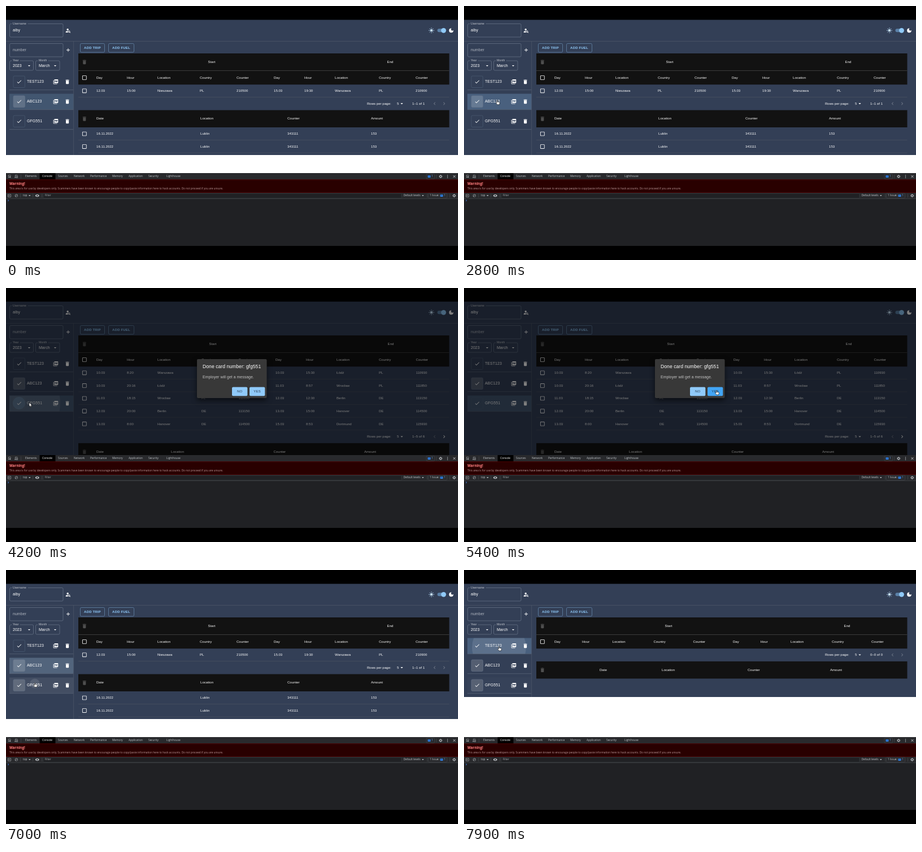
Write an HTML page with a canvas that moves like this. It is 800 px wide and 450 px high and loops after 8 s.

```html
<!DOCTYPE html>
<html>
<head>
<meta charset="utf-8">
<style>
html, body { margin: 0; width: 100%; height: 100%; overflow: hidden; background: #000 }
canvas { display: block }
</style>
</head>
<body>
<canvas id="stage" width="800" height="450"></canvas>
<script>
const c = document.getElementById('stage').getContext('2d');
const LOOP = 8000, ROW = 22.6;
const SANS = '"Liberation Sans", Arial, sans-serif', TOOL = '"Open Sans", "Noto Sans", sans-serif';
const BG = '#333f56', BLUE = '#90caf9', SOFT = '#c2c6cd', LINE = '#4c5668', EDGE = '#647084';

const ICON = {
  trash: 'M6 19c0 1.1.9 2 2 2h8c1.1 0 2-.9 2-2V7H6v12zM19 4h-3.5l-1-1h-5l-1 1H5v2h14V4z',
  check: 'M9 16.17 4.83 12l-1.42 1.41L9 19 21 7l-1.41-1.41z',
  pdf: 'M20 2H8c-1.1 0-2 .9-2 2v12c0 1.1.9 2 2 2h12c1.1 0 2-.9 2-2V4c0-1.1-.9-2-2-2zm-8.5 7.5c0 .83-.67 1.5-1.5 1.5H9v2H7.5V7H10c.83 0 1.5.67 1.5 1.5v1zm5 2c0 .83-.67 1.5-1.5 1.5h-2.5V7H15c.83 0 1.5.67 1.5 1.5v3zm4-3H19v1h1.5V11H19v2h-1.5V7h3v1.5zM4 6H2v14c0 1.1.9 2 2 2h14v-2H4V6z',
  person: 'M14 8a4 4 0 1 0-8 0 4 4 0 0 0 8 0zM10.4 14C6 13.8 2 16 2 18v2h9.5c-1-2-1.3-4-1.1-6zM19.4 18a4 4 0 1 0-1.4 1.4L20.6 22 22 20.6zM16 18a2 2 0 1 1 0-4 2 2 0 0 1 0 4z',
  drop: 'M7 10l5 5 5-5z',
  add: 'M19 13h-6v6h-2v-6H5v-2h6V5h2v6h6z',
  prev: 'M15.41 7.41 14 6l-6 6 6 6 1.41-1.41L10.83 12z',
  next: 'M10 6 8.59 7.41 13.17 12l-4.58 4.59L10 18l6-6z',
  box: 'M19 5v14H5V5h14m0-2H5c-1.1 0-2 .9-2 2v14c0 1.1.9 2 2 2h14c1.1 0 2-.9 2-2V5c0-1.1-.9-2-2-2z',
  moon: 'M12 3a9 9 0 1 0 9 9c0-.46-.04-.92-.1-1.36a5.4 5.4 0 0 1-4.4 2.26 5.4 5.4 0 0 1-3.14-9.8C12.92 3.04 12.46 3 12 3z',
  eye: 'M12 5C7 5 3 8 1 12c2 4 6 7 11 7s9-3 11-7c-2-4-6-7-11-7zm0 11a4 4 0 1 1 0-8 4 4 0 0 1 0 8z',
  close: 'M19 6.4 17.6 5 12 10.6 6.4 5 5 6.4 10.6 12 5 17.6 6.4 19 12 13.4 17.6 19 19 17.6 13.4 12z',
  pick: 'M3 3h16v6h-2V5H5v12h4v2H3zM10 10l11 4-4.500 2 4 4-1.500 1.500-4-4-2 4z',
  device: 'M5 3h15v4h-2V5H7v12h4v3H2v-3h3zM13 9h8v12h-8zM15 11v7h4v-7z',
  panel: 'M3 3h18v18H3zM5 5v14h14V5zM9 8l6 4-6 4z',
  block: 'M12 2a10 10 0 1 0 0 20 10 10 0 0 0 0-20zM12 4a8 8 0 0 1 5 1.700L5.700 17A8 8 0 0 1 12 4zM18.300 7A8 8 0 0 1 7 18.300z',
  arrow: 'M0 0V16l3.700-3.500L6.200 18l2.600-1.200L6.400 11.400H11.500z',
  hand: 'M-1.500 1.500Q0-1 1.500 1.500V7L8 8.500Q10 9 9.700 11.500L8 18H0L-5.500 11.500Q-5-.5 9-1.500 11z'
};
ICON.hand = 'M-1.500 1.500Q0-1 1.500 1.500V7L8 8.500Q10 9 9.700 11.500L8 18H0L-5.500 11.500Q-5 9-1.500 11z';
for (const k in ICON) ICON[k] = new Path2D(ICON[k]);

const TRIP = ['Day', 'Hour', 'Location', 'Country', 'Counter'], FUEL = ['Date', 'Location', 'Counter', 'Amount'];
const cells = s => s.split(' ');
const CARDS = [
  { name: 'TEST123', y: 134, trips: [], fuel: [], page: '0–0 of 0', bottom: 225,
    cols: [160, 209, 262.5, 335.5, 405.5, 476, 524.5, 578, 651, 721], fcols: [240, 350, 502, 648], heads: [362, 678] },
  { name: 'ABC123', y: 169, page: '1–1 of 1', bottom: 264,
    trips: ['12.03 15:00 Nieszawa PL 210500 15.03 19:30 Warszawa PL 210900'].map(cells),
    fuel: Array(2).fill(cells('16.11.2022 Lublin 343111 153')),
    cols: [160, 214, 268, 343, 408, 474, 528, 582, 660, 725], fcols: [160, 344, 498, 646], heads: [364, 680] },
  { name: 'GFG551', y: 204, page: '1–5 of 6', bottom: 296, fuel: [],
    trips: ['10.03 8:20 Warszawa PL 110300 10.03 15:30 Łódź PL 110930',
      '10.03 20:16 Łódź PL 110930 11.03 8:57 Wrocław PL 111850',
      '11.03 18:15 Wrocław PL 111850 12.03 12:30 Berlin DE 113150',
      '12.03 20:00 Berlin DE 113150 13.03 15:00 Hanover DE 114500',
      '13.03 8:00 Hanover DE 114500 15.03 8:53 Dortmund DE 115930'].map(cells),
    cols: [160, 214, 268, 346, 411.5, 477, 531, 585, 660, 725.5], fcols: [160, 292, 473.5, 634], heads: [366, 681] }
];

// time, x, y of the pointer tip
const PATH = [[1500, 300, 362], [1800, 200, 225], [2000, 200, 225], [2600, 59, 166.5], [2800, 59, 166.5],
  [3500, 23, 203], [3900, 23, 203], [4200, 41, 203], [4500, 62, 206], [4600, 62, 206], [5200, 447, 181],
  [5500, 447, 181], [5900, 137, 219], [6000, 111, 219], [6250, 57, 167], [6450, 57, 167], [6750, 51, 199.5],
  [7150, 51, 199.5], [7450, 62, 135], [8000, 62, 135]];
// time, x, y, card of each press
const CLICKS = [[3830, 23, 204, 2], [6350, 57, 169, 1], [6880, 51, 201, 2], [7500, 62, 137, 0]];
const SELECT = [[0, 1], [3900, 2], [6400, 1], [7100, 2], [7700, 0]];

const clamp = x => Math.max(0, Math.min(1, x));
const smooth = x => (x = clamp(x), x * x * (3 - 2 * x));

function pointer(t) {
  if (t < PATH[0][0]) return null;
  const i = PATH.findIndex(p => p[0] > t), a = PATH[i - 1], b = PATH[i];
  const k = (t - a[0]) / (b[0] - a[0]);
  return { x: a[1] + (b[1] - a[1]) * k, y: a[2] + (b[2] - a[2]) * k };
}
function rect(x, y, w, h, fill) { c.fillStyle = fill; c.fillRect(x, y, w, h); }
function round(x, y, w, h, r, fill, stroke, lw = .6) {
  c.beginPath(); c.roundRect(x, y, w, h, r);
  if (fill) { c.fillStyle = fill; c.fill(); }
  if (stroke) { c.strokeStyle = stroke; c.lineWidth = lw; c.stroke(); }
}
function disc(x, y, r, fill) { c.beginPath(); c.arc(x, y, r, 0, 7); c.fillStyle = fill; c.fill(); }
function text(s, x, y, size = 6, fill = '#fff', { font = SANS, bold = '', align = 'left', gap = .04 } = {}) {
  c.font = `${bold} ${size}px ${font}`;
  c.letterSpacing = gap + 'px';
  c.textAlign = align; c.textBaseline = 'middle';
  c.fillStyle = fill; c.fillText(s, x, y);
}
function icon(name, x, y, fill = '#fff', scale = .43) {
  c.save(); c.translate(x, y); c.scale(scale, scale); c.translate(-12, -12);
  c.fillStyle = fill; c.fill(ICON[name], 'evenodd'); c.restore();
}
function rays(x, y, r, R, n, color, w) {
  c.strokeStyle = color; c.lineWidth = w; c.beginPath();
  for (let i = 0; i < n; i++) {
    const a = i * Math.PI * 2 / n, u = Math.cos(a), v = Math.sin(a);
    c.moveTo(x + u * r, y + v * r); c.lineTo(x + u * R, y + v * R);
  }
  c.stroke();
}
function gear(x, y) {
  rays(x, y, 1.8, 3, 8, '#c0c4c8', 1);
  c.beginPath(); c.arc(x, y, 1.7, 0, 7); c.lineWidth = 1; c.stroke();
}
function field(x, y, w, h, label, labelW) {
  round(x, y, w, h, 2, null, EDGE, .8);
  if (!label) return;
  rect(x + 4, y - 2, labelW, 4, BG);
  text(label, x + 5.5, y, 5.1, SOFT);
}

function header(shift) {
  rect(0, 62, 800, .8, LINE);
  field(6.5, 31.5, 94.5, 23.5, 'Username', 28);
  text('alby', 12, 43.5, 7);
  icon('person', 110, 43.5);
  const x = -shift * 6.5;
  disc(753 + x, 43.3, 2.3, '#c5e2fa');
  rays(753 + x, 43.3, 3.2, 4.8, 8, '#b5d8f6', 1);
  round(763.5 + x, 40.3, 14.5, 6, 3, '#5b81a8');
  disc(774.5 + x, 43.3, 4.4, BLUE);
  icon('moon', 788 + x, 43.3);
}

function sidebar(t, sel, hover, shift) {
  field(6.5, 66.5, 94.5, 23.5);
  text('number', 12, 78.3, 7, '#b0b6c0');
  icon('add', 110 - shift, 78);
  field(6.5, 97, 42, 17, 'Year', 14);
  text('2023', 12, 105.8, 7); icon('drop', 41, 105.8);
  field(52.5, 97, 42.5, 17, 'Month', 18);
  text('March', 58, 105.8, 7); icon('drop', 87, 105.8);
  const right = 119.3 - shift * 1.5;
  rect(right, 62, .8, 234, LINE);
  CARDS.forEach((card, i) => {
    const y = card.y, top = y - 13.5;
    if (i == sel) rect(6, top, right - 6, 28, `rgba(144,202,249,${hover == i ? .24 : .16})`);
    else if (hover == i) rect(6, top, right - 6, 28, 'rgba(255,255,255,.08)');
    rect(6, y + 14.3, right - 6, .8, '#566175');
    const done = i == 1 || i == 2 && t >= 5600;
    round(13, y - 10, 20.5, 20.5, 2, done ? 'rgba(255,255,255,.16)' : null, done ? '#66758a' : '#4d6078');
    c.save();
    c.beginPath(); c.rect(6, top, right - 6, 28); c.clip();
    for (const [at, x, cy, id] of CLICKS) {
      const age = t - at;
      if (id != i || age < 0 || age > 1100) continue;
      const far = Math.max(x - 6, right - x) + 1, fade = 1 - clamp((age - 550) / 550);
      disc(x, cy, far * smooth(age / 550), `rgba(255,255,255,${.1 * fade})`);
      if (x < 33) disc(x, cy, 11 * smooth(age / 300), `rgba(144,202,249,${.2 * fade})`);
    }
    c.restore();
    icon('check', 23.3, y + .2);
    text(card.name, 37, y + .3, 7);
    icon('pdf', 88 - shift, y + .2);
    icon('trash', 108.6 - shift * 1.2, y + .3);
  });
}

function tables(card, mouse, shift) {
  // a scrollbar squeezes the columns slightly
  const fit = x => shift ? 127 + (x - 128) * 651 / 656.5 : x;
  const left = fit(128), width = fit(784.5) - left, tick = fit(138.8);
  for (const [s, x, w] of [['ADD TRIP', 131.5, 43], ['ADD FUEL', 181.5, 45]]) {
    round(x - shift, 66.5, w, 15.5, 2, null, '#6285a7', .8);
    text(s, x - shift + w / 2, 74.4, 6, BLUE, { bold: 'bold', align: 'center', gap: .18 });
  }
  rect(left, 84, width, 55.2, '#121212');
  rect(left, 114, width, .8, '#454545');
  icon('trash', tick, 99.3, '#4f4f4f');
  ['Start', 'End'].forEach((s, i) => text(s, fit(card.heads[i]), 99.3, 6, '#fff', { align: 'center' }));
  icon('box', tick, 127);
  card.cols.forEach((x, i) => text(TRIP[i % 5], fit(x), 127.2));

  function row(values, cols, y) {
    const over = mouse && mouse.x > left && mouse.x < left + width && Math.abs(mouse.y - y) < ROW / 2;
    if (over) rect(left, y - ROW / 2, width, ROW, 'rgba(255,255,255,.08)');
    if (over && Math.abs(mouse.x - tick) < 9) disc(tick, y, 9, 'rgba(255,255,255,.08)');
    rect(left, y + ROW / 2 - .6, width, .7, '#4b5261');
    icon('box', tick, y);
    values.forEach((s, i) => text(s, fit(cols[i]), y + .2));
  }
  card.trips.forEach((v, i) => row(v, card.cols, 150.3 + i * ROW));

  const py = 150.3 + card.trips.length * ROW, p = -shift * 6.5;
  text('Rows per page:', 639 + p, py, 6);
  text('5', 692 + p, py, 6);
  icon('drop', 700.5 + p, py);
  text(card.page, 719 + p, py, 6);
  icon('prev', 758.5 + p, py, '#707989');
  icon('next', 775.5 + p, py, card.trips.length > 1 ? '#fff' : '#707989');

  const fy = py + 11.6;
  rect(left, fy, width, 30.5, '#121212');
  icon('trash', tick, fy + 15.3, '#4f4f4f');
  card.fcols.forEach((x, i) => text(FUEL[i], fit(x), fy + 15.3));
  card.fuel.forEach((v, i) => row(v, card.fcols, fy + 42 + i * ROW));
}

function dialog(alpha, over) {
  if (alpha <= 0) return;
  c.globalAlpha = alpha;
  rect(0, 24.500, 800, 272, 'rgba(0,0,0,.5)');
  c.shadowColor = 'rgba(0,0,0,.6)'; c.shadowBlur = 10; c.shadowOffsetY = 4;
  round(338, 126, 123.5, 69, 2, '#383838');
  c.shadowColor = 'transparent'; c.shadowBlur = c.shadowOffsetY = 0;
  text('Done card number: gfg551', 348, 140, 8.6);
  text('Employer will get a message.', 348, 158.3, 6.9, '#c3c3c3');
  round(400, 175.5, 27.3, 15.7, 2, BLUE);
  round(431, 175.5, 27.3, 15.7, 2, over ? '#42a5f5' : BLUE);
  const opt = { align: 'center', gap: .18 };
  text('NO', 413.7, 183.5, 6, '#26384a', opt);
  text('YES', 444.6, 183.5, 6, '#26384a', opt);
  c.globalAlpha = 1;
}

function devtools() {
  const grey = '#c0c4c8', label = (s, x, y, size = 4.8, fill = grey, bold = '') => text(s, x, y, size, fill, { font: TOOL, bold, gap: 0 });
  const badge = (x, y) => { round(x, y - 2, 5, 4, .6, '#2f7de1'); rect(x + 1, y - .7, 3, .6, '#173c70'); };
  rect(0, 296, 800, 129, '#202124');
  rect(0, 296, 800, 12, '#292a2d');
  icon('pick', 6.5, 302, grey, .27);
  icon('device', 18, 302, grey, .29);
  rect(26, 298.5, .6, 7, '#4a4c50');
  rect(59.500, 296, 28, 12, '#000');
  const tabs = { Elements: 34, Console: 64, Sources: 92, Network: 120, Performance: 149, Memory: 188, Application: 217, Security: 252, Lighthouse: 284 };
  for (const s in tabs) label(s, tabs[s], 302, 4.8, s == 'Console' ? '#fff' : grey);
  round(744, 297.7, 14.5, 8.6, 1, null, '#45484d');
  badge(746.5, 302); label('1', 753, 302, 4.8, '#6aa5f5');
  rect(761.5, 298.5, .6, 7, '#4a4c50');
  gear(769.3, 302);
  for (const d of [-2.2, 0, 2.2]) disc(781.5, 302 + d, .65, grey);
  icon('close', 793.5, 302, grey, .32);
  rect(0, 307.5, 800, 23.500, '#290000');
  rect(0, 307.5, 800, .7, '#5c0000');
  rect(0, 330.4, 800, .7, '#5c0000');
  label('Warning!', 6, 315.7, 6.2, '#ff8080', 'bold');
  label('This area is for use by developers only. Scammers have been known to encourage people to copy/paste information here to hack accounts. Do not proceed if you are unsure.', 6, 323.5, 4.72, '#bd9a9a');
  rect(0, 331, 800, 10.500, '#292a2d');
  rect(0, 341.3, 800, .6, '#494c50');
  icon('panel', 6, 336, grey, .29);
  icon('block', 18.3, 336, grey, .25);
  label('top', 30, 336); icon('drop', 41.8, 335.8, grey, .36);
  icon('eye', 55.3, 336, grey, .32);
  for (const x of [25.5, 47.5, 63.5, 745.5, 785]) rect(x, 332.5, .6, 7, '#4a4c50');
  round(66, 332, 634, 8.4, .8, '#202124', '#3c4043');
  label('Filter', 68.5, 336.2, 4.8, '#a0a4a8');
  label('Default levels', 703.5, 336); icon('drop', 737.8, 335.8, grey, .36);
  round(747.500, 331.9, 33, 8.4, 1, null, '#45484d');
  label('1 Issue:', 750, 336); badge(768.5, 336); label('1', 775, 336, 4.8, '#6aa5f5');
  gear(793.3, 336);
  text('›', 3, 345.7, 6.5, '#4a8cf7', { bold: 'bold' });
}

function draw(t) {
  const mouse = pointer(t), late = pointer(t - 100);
  const sel = SELECT.filter(s => s[0] <= t).pop()[1], card = CARDS[sel];
  const fade = clamp((t - 3900) / 200) * (1 - clamp((t - 5480) / 220));
  const modal = t >= 3900 && t < 5700, shift = sel == 2 && !modal ? 1 : 0;
  const cardAt = p => p && !modal && p.x > 6 && p.x < 118 ? CARDS.findIndex(k => p.y > k.y - 13.5 && p.y < k.y + 14.5) : -1;
  const yesAt = p => p && modal && t < 5600 && p.x > 431 && p.x < 458 && p.y > 175 && p.y < 191;

  rect(0, 0, 800, 450, '#000');
  c.save();
  c.beginPath(); c.rect(0, 24.500, 800, 271.500); c.clip();
  rect(0, 24, 800, 272, BG);
  header(shift);
  sidebar(t, sel, cardAt(late), shift);
  tables(card, modal ? null : late, shift);
  rect(0, card.bottom, 800, 296 - card.bottom, '#fff');
  if (shift) {
    rect(793.5, 24, 6.5, 272, '#f1f1f1');
    rect(794.2, 31, 5.2, 213, '#c1c1c1');
    icon('drop', 796.8, 292.5, '#505050', .4);
    c.save(); c.translate(796.8, 28); c.scale(1, -1); icon('drop', 0, 0, '#a3a3a3', .4); c.restore();
  }
  dialog(fade, yesAt(late));
  c.restore();
  devtools();

  if (mouse) {
    const shape = ICON[cardAt(mouse) >= 0 || yesAt(mouse) ? 'hand' : 'arrow'];
    c.save(); c.translate(mouse.x, mouse.y); c.scale(.45, .45);
    c.fillStyle = '#fff'; c.strokeStyle = '#000'; c.lineWidth = 1.3;
    c.fill(shape); c.stroke(shape); c.restore();
  }
}

function tick() {
  draw(performance.now() % LOOP);
  requestAnimationFrame(tick);
}
tick();
</script>
</body>
</html>
```
